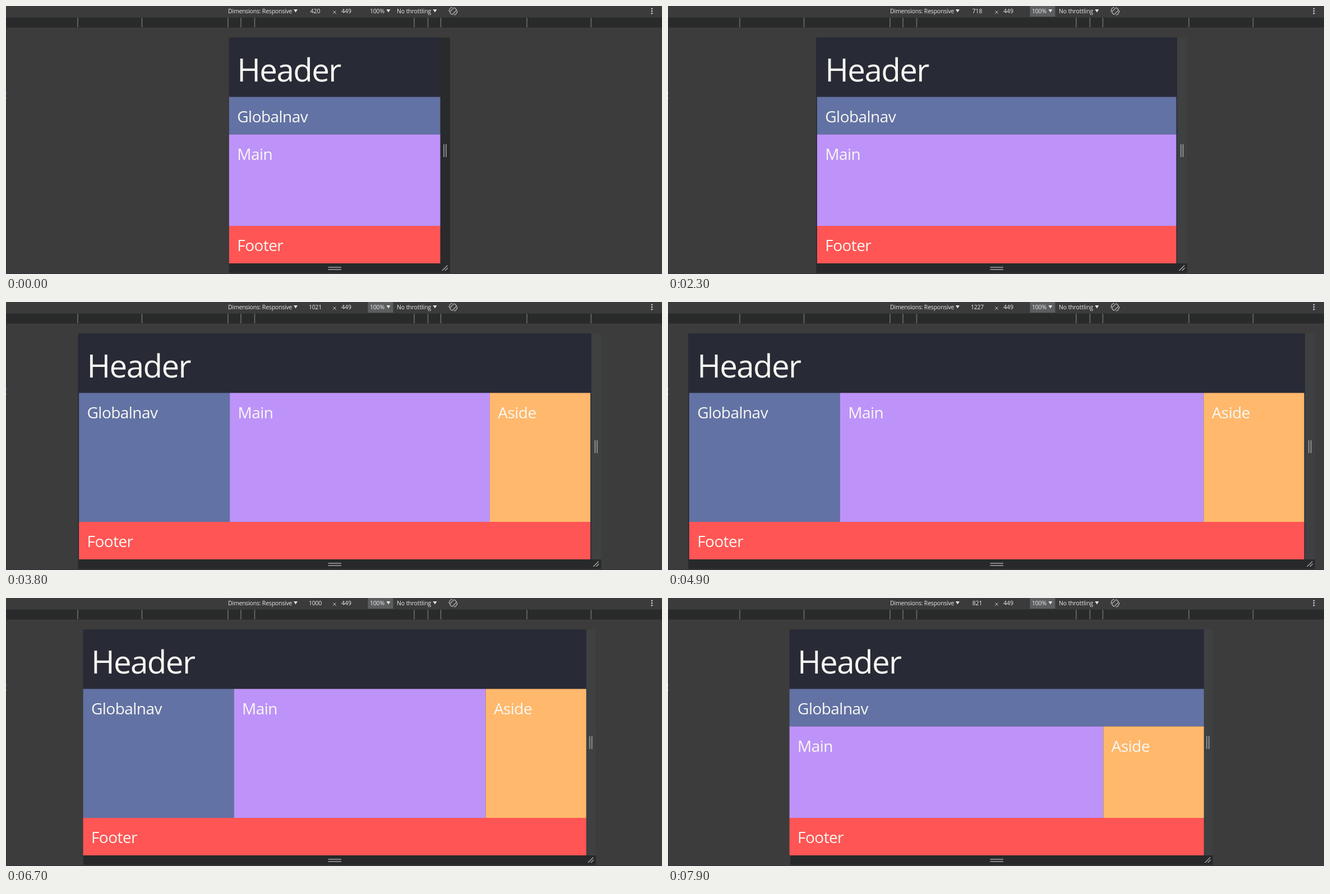
An HTML page with a canvas for the animation above (8000 ms loop, 1170x479 px).

```html
<!DOCTYPE html>
<html lang="en">
<head>
<meta charset="utf-8">
<title>Responsive layout</title>
<style>
  html, body { margin: 0; width: 100%; height: 100%; overflow: hidden; background: #3c3c3c; }
  canvas { display: block; }
</style>
</head>
<body>
<canvas id="stage" width="1170" height="479"></canvas>
<script>
const ctx = document.getElementById('stage').getContext('2d');
const LOOP = 8000, STEP = 100, LAG = 20;
const SCALE = 0.8967, MID = 586;
const TOP = 56.5, NAV = 162.5, MAIN = 229.5, FOOT = 393, END = 460;
const STRIP = 17.5, PAD = 14.4;
const FONT = '"Open Sans", "Noto Sans", sans-serif';
const TICKS = [128, 242.5, 396, 419, 443.5, 728, 752.5, 775.5, 929, 1043.5];

// [ms, viewport width] while the handle is dragged
const DRAG = [
  [700, 420], [1100, 466], [1500, 561], [1600, 586], [2500, 756], [3100, 883],
  [3400, 945], [3800, 1021], [4300, 1114], [4900, 1227], [5200, 1250], [5400, 1264],
  [5600, 1264], [6500, 1041], [6600, 1003], [6700, 1000], [7400, 902], [7900, 821]
];

function widthAt(t) {
  if (t <= DRAG[0][0]) return DRAG[0][1];
  const i = DRAG.findIndex(k => k[0] >= t);
  if (i < 0) return DRAG[DRAG.length - 1][1];
  const [t0, w0] = DRAG[i - 1], [t1, w1] = DRAG[i];
  return w0 + (w1 - w0) * (t - t0) / (t1 - t0);
}

function box(x0, y0, x1, y1, color) {
  ctx.fillStyle = color;
  ctx.fillRect(x0, y0, x1 - x0, y1 - y0);
}

function line(x0, y0, x1, y1, color, width) {
  ctx.strokeStyle = color;
  ctx.lineWidth = width;
  ctx.beginPath();
  ctx.moveTo(x0, y0);
  ctx.lineTo(x1, y1);
  ctx.stroke();
}

function label(str, x, y, size, color, align = 'left', spacing = -0.02) {
  ctx.font = `${size}px ${FONT}`;
  ctx.letterSpacing = `${size * spacing}px`;
  ctx.textAlign = align;
  ctx.fillStyle = color;
  ctx.fillText(str, x, y);
}

function caret(x) {
  ctx.fillStyle = '#e4e5e7';
  ctx.beginPath();
  ctx.moveTo(x, 6);
  ctx.lineTo(x + 7, 6);
  ctx.lineTo(x + 3.5, 11.5);
  ctx.fill();
}

function rotateIcon(x, y) {
  ctx.save();
  ctx.translate(x, y);
  ctx.strokeStyle = '#b4b6b8';
  ctx.lineWidth = 1.3;
  for (const turn of [0, Math.PI]) {
    ctx.beginPath();
    ctx.arc(0, 0, 7.2, turn - 0.15, turn + 1.35);
    ctx.stroke();
  }
  ctx.rotate(Math.PI / 4);
  ctx.beginPath();
  ctx.roundRect(-3.2, -6, 6.4, 12, 1.5);
  ctx.stroke();
  ctx.restore();
}

function toolbar(width, active) {
  box(0, 0, 1170, 20, '#3b3b3b');
  box(0, 20.5, 1170, 38.5, '#292a2a');
  for (const x of TICKS) line(x, 21, x, 38, '#6b6c6d', 1.6);
  if (active) box(645.5, 0, 690.5, 19, '#5d5e5f');

  const ink = '#e8eaed';
  label('Dimensions: Responsive', 396, 13, 10.5, ink);
  label(Math.round(width), 551.5, 13, 10.5, ink, 'center');
  label('449', 607, 13, 10.5, ink, 'center');
  label('100%', 649, 13, 10.5, ink);
  label('No throttling', 697, 13, 10.5, ink, 'left', -0.01);
  [513, 678.5, 761.5].forEach(caret);
  line(583.3, 8.5, 588.7, 13.8, '#c4c6c8', 1);
  line(583.3, 13.8, 588.7, 8.5, '#c4c6c8', 1);
  rotateIcon(797.5, 9);
  ctx.fillStyle = '#c8cacc';
  for (const y of [4.8, 9, 13.2]) {
    ctx.beginPath();
    ctx.arc(1152, y, 1.4, 0, 7);
    ctx.fill();
  }
}

function frame(width, hover) {
  const left = MID - width * SCALE / 2 + 0.2;
  const right = MID + width * SCALE / 2 + 0.2;
  const grip = '#a2a4a5';
  box(left, TOP, right, END, '#282a36');
  box(right, TOP, right + STRIP, END, hover ? '#3e4041' : '#292a2b');
  box(left, END, right + STRIP, 477, '#28292a');

  const x = right + 8.5;
  for (const dx of [-1.9, 1.9]) line(x + dx, 247, x + dx, 270, grip, 1.5);
  for (const y of [467, 471]) line(574.5, y, 598, y, grip, 1.5);
  line(x - 5, 473, x + 4.5, 463.5, grip, 1.5);
  line(x, 473, x + 5, 468, grip, 1.5);
}

function block(name, color, x0, y0, x1, y1) {
  box(x0, y0, x1, y1, color);
  label(name, x0 + PAD, y0 + 45.3, 28, '#f8f8f2');
}

function page(width) {
  const left = MID - width * SCALE / 2 + 0.2;
  const right = MID + width * SCALE / 2 + 0.2;
  const wide = width >= 992, medium = width >= 768;
  const mainLeft = wide ? left + 300 * SCALE : left;
  const mainRight = medium ? right - 200 * SCALE : right;
  const mainTop = wide ? NAV : MAIN;

  box(left, TOP, right, NAV, '#282a36');
  label('Header', left + PAD, 135, 56.5, '#f8f8f2', 'left', -0.029);
  block('Globalnav', '#6272a4', left, NAV, wide ? mainLeft : right, wide ? FOOT : MAIN);
  block('Main', '#bd93f9', mainLeft, mainTop, mainRight, FOOT);
  if (medium) block('Aside', '#ffb86c', mainRight, mainTop, right, FOOT);
  block('Footer', '#ff5555', left, FOOT, right, END);
}

function draw(now) {
  const t = Math.floor(now % LOOP / STEP) * STEP;
  const width = widthAt(t);
  box(0, 0, 1170, 479, '#3c3c3c');
  toolbar(width, t >= 800);
  frame(width, t >= 500);
  page(widthAt(t - LAG));
  box(0, 20, 1, 479, '#2f2d3a');
  box(0, 478, 1170, 479, '#352f3d');
  box(0, 155, 1, 156.5, '#7fb0c8');
  box(0, 164.5, 1, 166, '#7fb0c8');
}

const start = performance.now();
function tick() {
  draw(performance.now() - start);
  requestAnimationFrame(tick);
}
tick();
</script>
</body>
</html>
```
